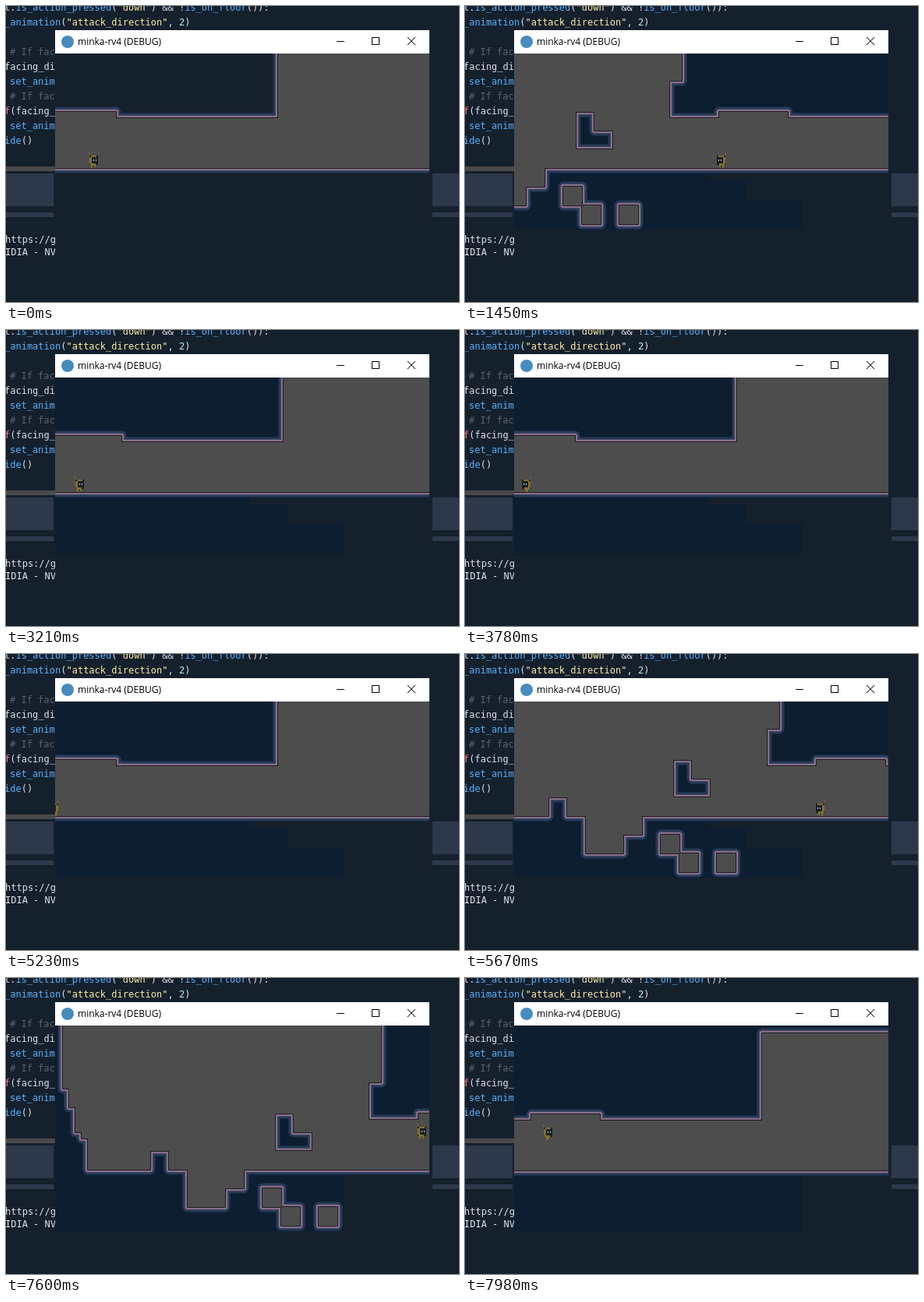
These frames come from a looping animation (581x380 px, 8000 ms). An HTML page with a canvas:

```html
<!DOCTYPE html>
<html lang="en">
<head>
<meta charset="utf-8">
<title>Platformer debug window</title>
<style>
  html, body { margin: 0; width: 100%; height: 100%; overflow: hidden; background: #15202d; }
  canvas { display: block; }
</style>
</head>
<body>
<canvas id="stage" width="581" height="380"></canvas>
<script>
const ctx = document.getElementById('stage').getContext('2d');
const LOOP = 8, ROOM = 476, SMOOTH = 10, TILE = 8;
const JUMP_AT = 7.05, JUMP_SPEED = 125, JUMP_HEIGHT = 39;
const BG = '#15202d', ROCK = '#0c1e2f', CAVE = '#4d4d4d';
const WHITE = '#dde1e6', BLUE = '#57b3ff', YELLOW = '#ffeda1', MINT = '#a1ffe0', DIM = '#59626c';

// Turning points of the player: [seconds, x]
const turns = [[0, 112], [0.2, 123], [1.85, 34], [3.45, 96], [4.1, 62], [5.5, 62], [7, 30], [8, 75]];
// Moments when the camera heads for the other room
const doors = [1.366, 2.785, 5.49, 7.71];

// Cave outline in tiles: main hall, L-shaped block, pockets below the floor
const outline = new Path2D(
  'M9-5V13h1v3h1v4h1v1h1v5h10v-3h3v3h3v6h6v-3h3v-3H138V4H103V18H77V17H66V18H58V12h2V-5z' +
  'M43 17h3v3h3v3h-6z' +
  'M41 29h3v3h3v3h-3v-3h-3z' +
  'M50 32h3v3h-3z');
const cave = new Path2D();
cave.addPath(outline, new DOMMatrix([TILE, 0, 0, TILE, 1, 0]));

function player(t) {
  const i = turns.findIndex(([end]) => t < end);
  const [t0, a] = turns[i - 1], [t1, b] = turns[i];
  return { x: a + (b - a) * (t - t0) / (t1 - t0), facing: b > a ? 1 : -1, moving: a !== b };
}

// A steady rise that stops at JUMP_HEIGHT; follow() shapes each second of rise
function rise(t, follow) {
  const s = t - JUMP_AT;
  const part = u => u > 0 ? JUMP_SPEED * follow(u) : 0;
  return part(s) - part(s - JUMP_HEIGHT / JUMP_SPEED);
}

// The camera approaches its goal exponentially on both axes
function camera(t) {
  let x = 0;
  doors.forEach((door, i) => {
    if (t <= door) return;
    const left = ROOM * Math.exp(-SMOOTH * (t - door));
    x = i % 2 ? left : ROOM - left;
  });
  const y = rise(t, u => u - (1 - Math.exp(-SMOOTH * u)) / SMOOTH);
  return { x: Math.round(x), y: Math.round(y) };
}

function rect(color, x, y, w, h) {
  ctx.fillStyle = color;
  ctx.fillRect(x, y, w, h);
}

function code(x, y, ...parts) {
  ctx.font = '12px "DejaVu Sans Mono", monospace';
  for (const [text, color] of parts) {
    ctx.fillStyle = color;
    ctx.fillText(text, x, y);
    x += ctx.measureText(text).width;
  }
}

function drawEditor() {
  rect(BG, 0, 0, 581, 380);
  rect('#4a4a4a', 0, 206, 63, 6);
  for (const [x, w] of [[0, 61], [547, 34]]) {
    rect('#2d394b', x, 215, w, 42);
    rect('#2d394b', x, 265, w, 6);
  }
  const lines = [
    [-2, ['t.', WHITE], ['is_action_pressed', BLUE], ['(', WHITE], ['"down"', YELLOW],
      [') && !', WHITE], ['is_on_floor', BLUE], ['()):', WHITE]],
    [-2, ['_animation', BLUE], ['(', WHITE], ['"attack_direction"', YELLOW], [', ', WHITE],
      ['2', MINT], [')', WHITE]],
    [0],
    [5, ['# If faci', DIM]],
    [-2, ['facing_dir', WHITE]],
    [5, ['set_anima', BLUE]],
    [5, ['# If faci', DIM]],
    [-2, ['f', '#ff7085'], ['(facing_d', WHITE]],
    [5, ['set_anima', BLUE]],
    [-2, ['ide', BLUE], ['()', WHITE]],
  ];
  lines.forEach(([x, ...parts], i) => code(x, 6 + 19 * i, ...parts));
  code(-1, 304, ['https://g', WHITE]);
  code(-1, 320, ['IDIA - NV', WHITE]);
}

function drawTitleBar() {
  rect('#fff', 63, 31, 480, 30);
  ctx.fillStyle = '#478cbf';
  ctx.beginPath();
  ctx.arc(79, 46, 8, 0, 7);
  ctx.fill();
  ctx.fillStyle = '#000';
  ctx.font = '12px "Open Sans", sans-serif';
  ctx.fillText('minka-rv4 (DEBUG)', 92, 50);
  ctx.strokeStyle = '#000';
  ctx.lineWidth = 1;
  ctx.strokeRect(469.5, 40.5, 9, 9);
  ctx.stroke(new Path2D('M424 45.5h10M515 40l10 10M525 40l-10 10'));
}

function drawRock(t, lift) {
  rect(BG, 63, 61, 480, 319);
  if (t < doors[0]) return;
  rect(ROCK, 63, 61, 480, 153 + lift);
  if (t > JUMP_AT) return rect(ROCK, 63, 214, 370, 73 + lift);
  rect(ROCK, 63, 214, 250, 10);
  rect(ROCK, 63, 224, 298, 24);
  rect(ROCK, 63, 248, 370, 39);
}

function drawCave(cam) {
  ctx.save();
  ctx.translate(cam.x - ROOM, cam.y);
  ctx.lineJoin = 'round';
  for (const [color, width] of [['#243a58', 13], ['#4a4766', 8], ['#a08397', 5.5], ['#211f2b', 2.5]]) {
    ctx.strokeStyle = color;
    ctx.lineWidth = width;
    ctx.stroke(cave);
  }
  ctx.fillStyle = CAVE;
  ctx.fill(cave, 'evenodd');
  ctx.restore();
}

function drawPlayer(x, y, facing, step) {
  const dark = '#1a1d22', gold = '#80702f', eye = '#c9cdb8';
  ctx.save();
  ctx.translate(Math.round(x), Math.round(y));
  ctx.scale(facing, 1);
  for (let i = 0; i < 3; i++) rect(gold, -6 + i, -10 + 2 * i, 1, 2);
  rect(dark, -5, -6, 11, 12);
  rect(gold, -5, -4, 3, 8);
  rect(gold, -3, -6, 7, 2);
  rect(gold, -4, 4, 7, 3);
  rect('#152431', -1, -3, 6, 5);
  rect(eye, 0, -1, 1, 2);
  rect(eye, 3, -1, 1, 2);
  rect(dark, -3, 7, 6, 1);
  rect(gold, -3 + step, 7, 2, 3);
  rect(gold, 1 - step, 7, 2, 2);
  ctx.restore();
}

function render(t) {
  const cam = camera(t), { x, facing, moving } = player(t);
  const height = rise(t, u => u);
  drawEditor();
  ctx.save();
  ctx.beginPath();
  ctx.rect(63, 61, 480, 319);
  ctx.clip();
  drawRock(t, cam.y);
  drawCave(cam);
  drawPlayer(x + cam.x, 197.5 - height + cam.y, facing, moving ? Math.floor(t * 10) % 2 : 0);
  ctx.restore();
  drawTitleBar();
}

const start = performance.now();
function tick() {
  render((performance.now() - start) / 1000 % LOOP);
  requestAnimationFrame(tick);
}
tick();
</script>
</body>
</html>
```
